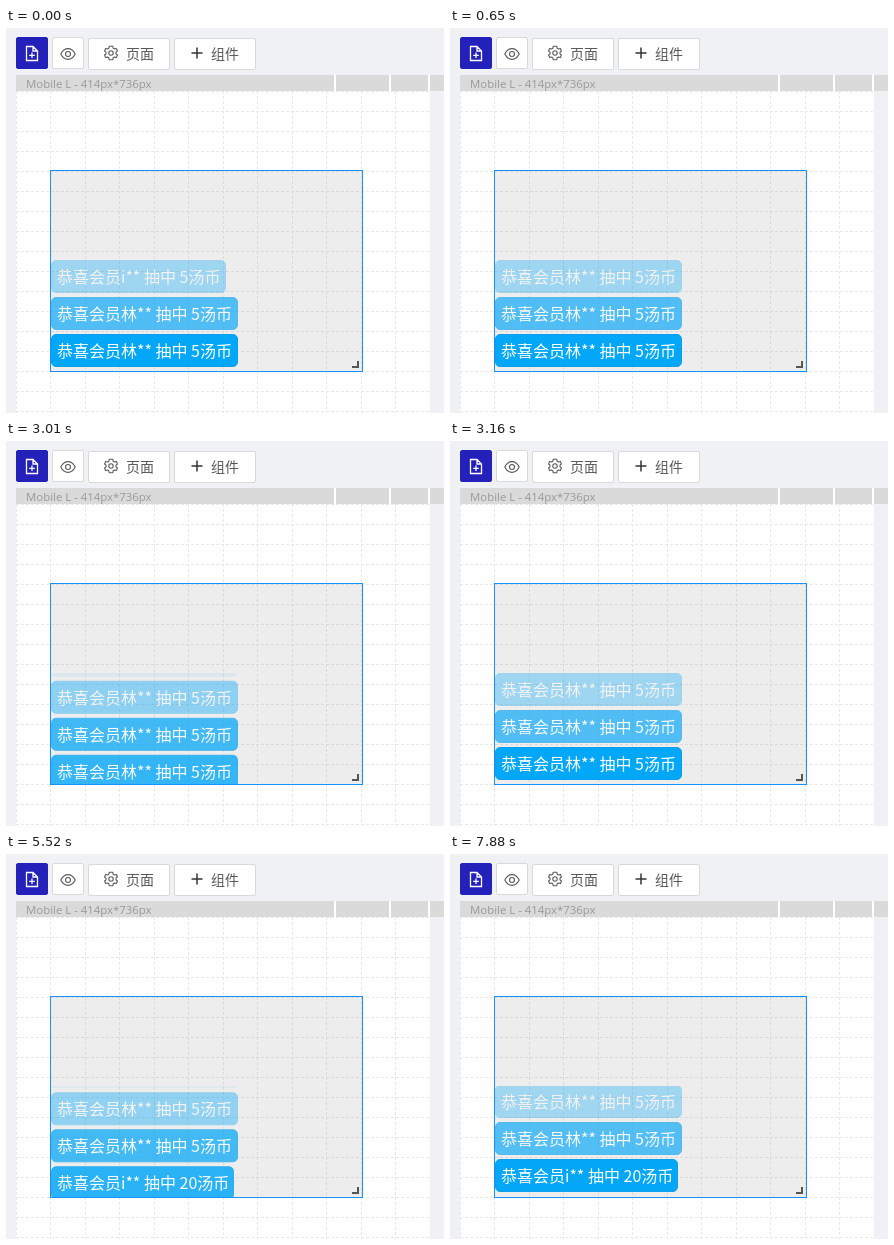
Animation of 438x385 px, one loop 8 s. Source, as an HTML page:

```html
<!DOCTYPE html>
<html lang="zh-CN">
<head>
<meta charset="utf-8">
<title>Page editor</title>
<style>
  @property --s { syntax: "<number>"; inherits: true; initial-value: 0; }

  html, body { margin: 0; width: 100%; height: 100%; overflow: hidden; }
  body {
    position: relative;
    background: #f0f1f4;
    font-family: "Noto Sans CJK SC", "Noto Sans CJK", sans-serif;
  }
  body *, .panel::after { box-sizing: border-box; }
  .btn, .ruler, .ruler i, .page, .panel, .feed, .row, svg { position: absolute; }

  /* toolbar */
  .btn {
    top: 10px; height: 32px;
    border: 1px solid #d9d9d9; border-radius: 2px;
    background: #fff; color: #595959;
    font-size: 14px; line-height: 28px; white-space: nowrap;
  }
  .btn span { position: absolute; left: 37px; }
  .btn.icon { top: 9px; width: 32px; }
  .btn.main { background: #2321b9; border-color: #2321b9; color: #fff; }
  svg { fill: none; stroke: currentColor; stroke-width: 1.1; }

  .ruler {
    left: 10px; top: 47px; width: 428px; height: 16px;
    background: #dadada; color: #999;
    font: 11.4px/17px "Open Sans", "Noto Sans", sans-serif;
    padding-left: 10px; white-space: nowrap;
  }
  .ruler i { top: 0; width: 2px; height: 16px; background: #fff; }

  .page {
    left: 10px; top: 63px; width: 414px; height: 322px;
    background: #fefefe; overflow: hidden;
  }
  .page svg { left: 0; top: 0; stroke: #e9e9e9; stroke-width: 1; stroke-dasharray: 3 2; }

  .panel {
    left: 44px; top: 142px; width: 313px; height: 202px;
    border: 1px solid #1890ff; background: rgba(0, 0, 0, .066);
  }
  .panel::after {
    content: ""; position: absolute; right: 3px; bottom: 3px;
    width: 7px; height: 7px;
    border: solid #555; border-width: 0 2px 2px 0;
  }

  /* --s counts the rows scrolled away; rows fade by their position */
  .feed {
    left: 45px; top: 232px; width: 300px; height: 111px; overflow: hidden;
    animation: scroll 8s step-end infinite;
  }
  .row {
    --y: calc(var(--i) - var(--s));
    left: 0; top: 0; height: 33px; padding-left: 5px;
    border: 1px solid #0b9fec; border-radius: 5px;
    background: #03a7f8; color: #fff;
    font-size: 16px; font-weight: 500; line-height: 31px; white-space: nowrap;
    transform: translateY(calc(var(--y) * 37px));
    opacity: min((var(--y) + 1) / 3, 3 - var(--y));
  }
  @keyframes scroll {
    0% { --s: 0; }
    6.25% { --s: .75; }
    8.125% { --s: 1; }
    36.125% { --s: 1.081; }
    37.625% { --s: 1.79; }
    39.5% { --s: 2; }
    67.375% { --s: 2.108; }
    69% { --s: 2.83; }
    70.75% { --s: 3; }
    98.5%, 100% { --s: 3.027; }
  }
</style>
</head>
<body>
  <div class="btn icon main" style="left:10px">
    <svg style="left:7px;top:7px" width="16" height="17" viewBox="0 0 16 17">
      <path stroke-width="1.3" d="M2.5 1.5H9L13.5 6V15.5H2.5ZM9 1.5V6H13.5M8 7.5V13M5.2 10.3H10.8"/>
    </svg>
  </div>
  <div class="btn icon" style="left:46px">
    <svg style="left:7px;top:9px" width="16" height="14" viewBox="0 0 16 14">
      <path d="M.8 7Q3.5 1.6 8 1.6T15.2 7Q12.5 12.4 8 12.4T.8 7Z"/>
      <circle cx="8" cy="7" r="2.5"/>
    </svg>
  </div>
  <div class="btn" style="left:82px;width:82px">
    <svg style="left:15px;top:6px" width="14" height="16" viewBox="0 0 14 16">
      <path stroke-linejoin="round" d="M5.3 1.2H8.7L9.2 3.2L10.5 4L12.4 3.4L13.4 6L12 7.2V8.8L13.4 10L12.4 12.6L10.5 12L9.2 12.8L8.7 14.8H5.3L4.8 12.8L3.5 12L1.6 12.6L.6 10L2 8.8V7.2L.6 6L1.6 3.4L3.5 4L4.8 3.2Z"/>
      <circle cx="7" cy="8" r="2.2"/>
    </svg>
    <span>页面</span>
  </div>
  <div class="btn" style="left:168px;width:82px">
    <svg style="left:16px;top:8px;color:#333" width="12" height="12" viewBox="0 0 12 12">
      <path stroke-width="1.5" d="M6 .5V11.5M.5 6H11.5"/>
    </svg>
    <span style="left:36px">组件</span>
  </div>

  <div class="ruler">Mobile L - 414px*736px
    <i style="left:318px"></i><i style="left:373px"></i><i style="left:412px"></i>
  </div>
  <div class="page"><svg width="414" height="322"><path id="grid"/></svg></div>
  <div class="panel"></div>

  <div class="feed">
    <div class="row" style="--i:0;width:175px">恭喜会员i** 抽中 5汤币</div>
    <div class="row" style="--i:1;width:187px">恭喜会员林** 抽中 5汤币</div>
    <div class="row" style="--i:2;width:187px">恭喜会员林** 抽中 5汤币</div>
    <div class="row" style="--i:3;width:187px">恭喜会员林** 抽中 5汤币</div>
    <div class="row" style="--i:4;width:187px">恭喜会员林** 抽中 5汤币</div>
    <div class="row" style="--i:5;width:183px">恭喜会员i** 抽中 20汤币</div>
  </div>

<script>
  const lines = [];
  for (let x = 0; x < 414; x += 34.5) lines.push(`M${Math.floor(x) + .5} 0V322`);
  for (let y = 0; y < 322; y += 20) lines.push(`M0 ${y + .5}H414`);
  document.getElementById("grid").setAttribute("d", lines.join(""));
</script>
</body>
</html>
```
